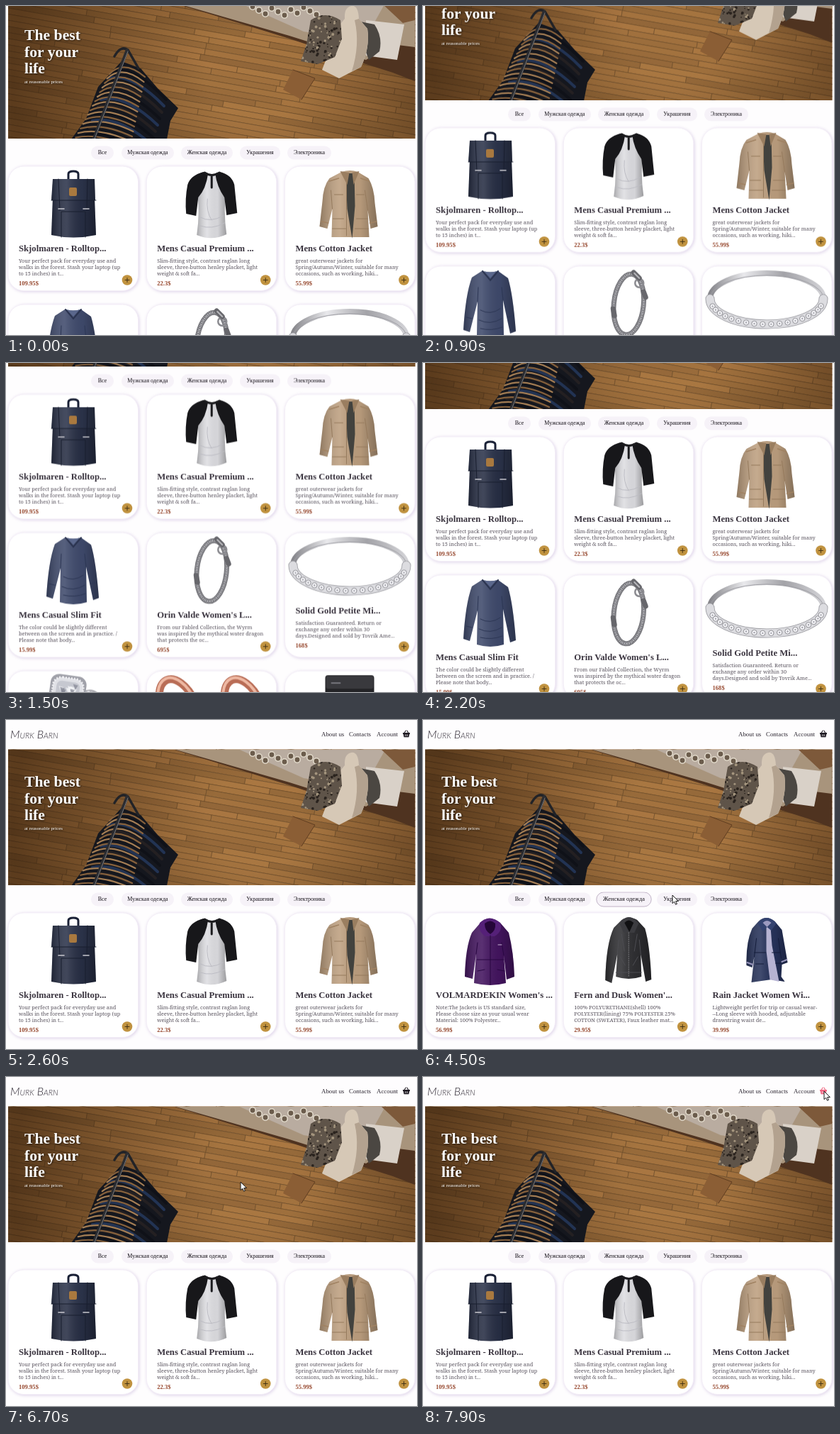
An HTML page that plays this animation: 580 px wide and 464 px high, repeating every 8000 ms.

```html
<!DOCTYPE html>
<html lang="en">
<head>
<meta charset="utf-8">
<title>Shop page</title>
<style>
html, body { margin: 0; width: 100%; height: 100%; overflow: hidden; background: #fefdfe; }
svg { display: block; width: 580px; height: 464px; font-family: "Liberation Serif", serif; }
#page, #cursor, .set, .pill, #basket, #pointer { animation: 8s linear infinite; }
#page { animation-name: scroll; }
#cursor { animation-name: move; animation-timing-function: ease-in-out; }
#pointer { animation-name: appear; animation-timing-function: step-end; }
.set { animation-timing-function: step-end; }
#all { animation-name: show-all; }
#women { animation-name: show-women; }
#jewelry { animation-name: show-jewelry; }
#basket { animation-name: basket; color: #1d1820; }
.pill { transform-box: fill-box; transform-origin: center; font-size: 8px; text-anchor: middle; stroke: transparent; }
.pill rect { fill: #f6f2f8; stroke-width: .8; }
.pill text { fill: #151118; stroke: none; }
#pill0 { animation-name: hover-all; }
#pill1 { animation-name: hover-men; }
#pill2 { animation-name: hover-women; }
#pill3 { animation-name: hover-jewelry; }
.box { fill: #fff; stroke: #f4eff7; filter: drop-shadow(1px 1px 2px #dcd1e8); }
.title { font-size: 12.7px; font-weight: bold; fill: #3a343f; }
.desc { font: 7.35px "Noto Serif", serif; fill: #57515c; }
.price { font-size: 8.6px; font-weight: bold; fill: #97492f; }
.nav { font-size: 8.9px; fill: #2c2631; }
.brand { font: italic 300 small-caps 16px Lato, sans-serif; fill: #29232e; }
.slogan { fill: #fff; filter: drop-shadow(1px 1px 1px #0009); }

@keyframes scroll {
  0%, 7.5% { transform: translateY(-46px); }
  11.25% { transform: translateY(-100px); }
  18.75% { transform: translateY(-227.5px); }
  21.25%, 25% { transform: translateY(-262px); }
  32%, 100% { transform: translateY(0); }
}
@keyframes move {
  0%, 36.25% { transform: translate(232px, 412px); }
  42%, 46% { transform: translate(202px, 252px); }
  50%, 53% { transform: translate(290px, 252px); }
  56.25% { transform: translate(352px, 247px); }
  58.5%, 64% { transform: translate(361px, 252px); }
  71.25% { transform: translate(153px, 253px); }
  73.5%, 76% { transform: translate(137px, 254px); }
  81.5% { transform: translate(300px, 165px); }
  91%, 100% { transform: translate(566px, 20px); }
}
@keyframes appear { 0% { visibility: hidden; } 36.25% { visibility: visible; } }
@keyframes show-all { 0% { visibility: visible; } 52.5% { visibility: hidden; } 75% { visibility: visible; } }
@keyframes show-women { 0% { visibility: hidden; } 52.5% { visibility: visible; } 61.9% { visibility: hidden; } }
@keyframes show-jewelry { 0% { visibility: hidden; } 61.9% { visibility: visible; } 75% { visibility: hidden; } }
@keyframes basket { 0%, 90% { color: #1d1820; } 92%, 100% { color: #ee6480; } }
@keyframes hover-all {
  0%, 72.5%, 79%, 100% { transform: none; stroke: transparent; }
  74.5%, 77% { transform: scale(1.06); stroke: #b6a6bd; }
}
@keyframes hover-men {
  0%, 41%, 49.5%, 69%, 74.5%, 100% { transform: none; stroke: transparent; }
  43%, 47.5%, 70.5%, 72% { transform: scale(1.06); stroke: #b6a6bd; }
}
@keyframes hover-women {
  0%, 48%, 58.5%, 65.5%, 70%, 100% { transform: none; stroke: transparent; }
  50%, 56.5%, 67%, 68% { transform: scale(1.06); stroke: #b6a6bd; }
}
@keyframes hover-jewelry {
  0%, 56.4%, 67.5%, 100% { transform: none; stroke: transparent; }
  58.5%, 65% { transform: scale(1.06); stroke: #b6a6bd; }
}
</style>
</head>
<body>
<svg id="stage" viewBox="0 0 580 464"></svg>
<script>
let seed = 11;
const random = () => (seed = (seed * 16807) % 2147483647) / 2147483647;
const repeat = (count, draw) => Array.from({ length: count }, (_, i) => draw(i)).join('');
const path = (d, fill, extra = '') => `<path d="${d}" fill="${fill}" ${extra}/>`;
const shaded = (d, fill) => path(d, fill) + path(d, 'url(#folds)');
const line = (d, color, width = 1, extra = '') =>
  path(d, 'none', `stroke="${color}" stroke-width="${width}" stroke-linecap="round" ${extra}`);
const rect = (x, y, w, h, fill, extra = '') =>
  `<rect x="${x}" y="${y}" width="${w}" height="${h}" fill="${fill}" ${extra}/>`;
const circle = (x, y, r, fill, extra = '') => `<circle cx="${x}" cy="${y}" r="${r}" fill="${fill}" ${extra}/>`;
const text = (x, y, content, type, extra = '') => `<text x="${x}" y="${y}" class="${type}" ${extra}>${content}</text>`;

// Product pictures, in card coordinates
const art = {
  backpack: () =>
    line('M85 19V11Q85 7 92 7T99 11V19', '#1a2136', 3) +
    shaded('M64 18H121L124 97Q92 104 61 97Z', '#272e44') +
    shaded('M63 18H122L123 48H61Z', '#2c344b') +
    line('M61 48H124M75 100V64H109V100M71 18L73 62M112 18L111 62', '#191e2f') +
    rect(86, 30, 11, 12, '#a9793f', 'rx="2"') +
    line('M71 60h8M106 60h8', '#c9c9cf', 1.6),
  raglan: () =>
    shaded('M78 11Q92 15 107 11L113 36Q108 62 113 96Q92 106 71 97Q76 62 71 36Z', '#dedee2') +
    path('M80 8Q62 13 58 26Q54 46 56 67L70 70L73 44Q84 32 87 10Z', '#17171a') +
    path('M104 8Q120 12 124 26L128 66L113 69L110 44Q99 28 97 10Z', '#17171a') +
    line('M82 9Q92 16 103 9M92 14V30', '#1b1b1e', 3) +
    line('M76 72Q90 80 108 70M76 84Q92 90 110 80M86 46Q84 64 92 76', '#bdbdc4'),
  fieldJacket: () =>
    shaded('M80 8Q92 4 103 8L118 17Q126 30 127 52L131 85L121 88L117 62L119 100H66L67 60L60 88L49 85L53 50Q54 28 63 17Z', '#bd9f7f') +
    path('M86 10L98 10L99 56L95 102L88 60Z', '#42423e') +
    path('M78 7L88 26L91 9ZM105 7L97 26L95 9Z', '#9a7e60') +
    line('M67 60L65 34M117 62L113 34M87 24V98M68 74H83M101 74H117M70 40H82M101 40H112M67 88H86M99 88H118', '#957a5d') +
    line('M63 21L76 17M107 17L119 21M52 78L61 80M120 80L129 78', '#a08262', 1.6),
  slimShirt: () =>
    shaded('M80 7Q92 10 103 7L117 17Q124 40 128 92L120 95L110 48L111 98Q92 104 73 98L74 50L63 93L54 90Q57 40 66 16Z', '#3f4a6c') +
    path('M83 7L92 17L101 7Q92 10 83 7Z', '#5a678c') +
    line('M81 7L92 20L103 7', '#2b3450', 2) +
    line('M74 50L75 30M110 48L108 30M78 62Q92 70 106 60M76 76Q92 84 108 74M78 88Q94 92 109 86M58 72L66 74M117 72L124 70', '#2d3755'),
  bracelet: () => {
    const band = (color, width, dash) => `<ellipse cx="92" cy="54" rx="21" ry="43" fill="none" stroke="${color}"
      stroke-width="${width}" stroke-dasharray="${dash}" transform="rotate(6 92 54)"/>`;
    return band('#727277', 7, 'none') + band('#a9a9ae', 5, '1 1.4') + band('#cfcfd3', 1, '1.5 2') +
      circle(107, 24, 6, 'none', 'stroke="#8b8b90" stroke-width="2.5"') +
      line('M99 9L107 17M113 36L116 44M70 60L72 70', '#67676c', 7) + line('M100 10L107 17', '#b9b9bd', 2);
  },
  bandRing: () => {
    const hoop = (ry, color, width) => `<ellipse cx="91.5" cy="46" rx="80" ry="${ry}" fill="none"
      stroke="${color}" stroke-width="${width}"/>`;
    const front = 'M11.5 46A80 36 0 0 0 171.5 46';
    const stone = i => {
      const angle = .3 + i * .15;
      const x = 91.5 - 80 * Math.cos(angle), y = 46 + 36 * Math.sin(angle);
      return circle(x, y, 3.7, '#f6f6f9', 'stroke="#85858b" stroke-width=".9"') + circle(x, y, 1.2, '#a4a4ac');
    };
    return hoop(36, 'url(#silver)', 8) + hoop(33, '#a0a0a6', 1) +
      line(front, '#97979d', 13) + line(front, '#dcdce0', 11.4) + repeat(18, stone);
  },
  diamond: () =>
    line('M108 32C134 22 140 64 96 97M73 55Q76 78 87 98M106 48Q112 80 88 97', '#adadb3', 8.5) +
    line('M108 31C130 24 135 64 96 95M73 55Q76 78 87 96M106 48Q110 80 88 95', '#f0f0f4', 4, 'stroke-dasharray="1 4"') +
    rect(58, 6, 51, 50, '#a0a1a9', 'rx="12" transform="rotate(8 84 31)"') +
    rect(62, 10, 43, 42, '#e0e1e6', 'rx="12" transform="rotate(8 84 31)" stroke="#f2f2f5" stroke-width="3" stroke-dasharray="2 2"') +
    rect(67, 15, 33, 32, '#c6c8d0', 'rx="7" transform="rotate(8 84 31)"') +
    repeat(28, () => {
      const x = 69 + random() * 23, y = 17 + random() * 22;
      return path(`M${x} ${y}l7 2l-4 6z`, random() < .6 ? '#f4f5f8' : '#888b97', 'opacity=".8"');
    }),
  earrings: () => repeat(2, i => `<g transform="translate(${i * 92})">` +
    '<ellipse cx="46" cy="52" rx="24" ry="43" fill="#fff" stroke="#b96d56" stroke-width="11" transform="rotate(-24 46 52)"/>' +
    '<ellipse cx="45" cy="51" rx="25" ry="44" fill="none" stroke="#eeb9a3" stroke-width="4" transform="rotate(-24 45 51)"/></g>'),
  drive: () => rect(57, 6, 69, 98, '#232326', 'rx="4"') + rect(58, 7, 67, 18, '#39393d', 'rx="3"') +
    line('M66 17H78', '#77777d', 2),
  parka: () =>
    shaded('M78 14Q90 1 106 14L118 28Q125 56 126 90L115 94L111 60L114 99Q92 105 69 99L72 58L67 93L56 90Q57 48 66 28Z', '#43145f') +
    path('M77 14Q90 2 106 14Q110 26 98 33H85Q74 26 77 14Z', '#552078') +
    path('M84 15Q92 8 99 15Q100 25 92 30Q84 25 84 15Z', '#250638') +
    line('M92 32V101M72 58L74 42M111 60L108 42M73 66H111M74 82L84 80M102 80L112 82', '#280741') +
    line('M103 45h5', '#c9b6d4'),
  leather: () =>
    shaded('M82 10Q92 3 104 10L115 22Q122 46 124 94L116 97L109 58L110 90Q92 96 74 90L76 58L68 99L59 95Q60 44 71 21Z', '#2e2e31') +
    path('M79 15Q92 -3 106 15L100 28H85Z', '#3c3c40') + path('M86 14Q92 7 99 14L93 27Z', '#111113') +
    line('M76 58L78 38M109 58L107 38M80 62L87 74M105 62L98 74M74 84H110M82 30L86 54M104 30L100 54', '#4d4d52') +
    line('M92 28V90', '#a2a2a7', .7, 'stroke-dasharray="1 2"'),
  raincoat: () =>
    shaded('M80 12Q90 2 103 12L113 24L121 70L113 73L112 90L117 97L98 94L70 98L74 62L71 77L63 74Q62 42 71 22Z', '#26325a') +
    path('M91 20L97 20L99 46L109 97L96 94L91 54Z', '#b6b3d2') +
    path('M79 15Q92 -1 105 15L98 25L92 20L86 26Z', '#344370') + path('M86 14Q92 8 98 14L92 20Z', '#9c9ac0') +
    line('M74 62L77 36M112 64L108 36M74 56H90M99 56H111M76 72H87M104 71H111', '#141d3b') +
    line('M64 70L72 73M113 69L120 66', '#9997bd', 2)
};

const bracelet = { art: 'bracelet', title: "Orin Valde Women's L...", price: 695, desc:
  'From our Fabled Collection, the Wyrm|was inspired by the mythical water dragon|that protects the oc...' };
const bandRing = { art: 'bandRing', title: 'Solid Gold Petite Mi...', price: 168, lift: 6, desc:
  'Satisfaction Guaranteed. Return or|exchange any order within 30|days.Designed and sold by Tovrik Ame...' };
const diamond = { art: 'diamond', title: 'White Gold Plated Pr...', price: 9.99, desc:
  'Classic Created Wedding Engagement|Solitaire Diamond Promise Ring for Her.|Gifts to spoil your love ...' };

const sets = {
  all: [
    { art: 'backpack', title: 'Skjolmaren - Rolltop...', price: 109.95, desc:
      'Your perfect pack for everyday use and|walks in the forest. Stash your laptop (up|to 15 inches) in t...' },
    { art: 'raglan', title: 'Mens Casual Premium ...', price: 22.3, desc:
      'Slim-fitting style, contrast raglan long|sleeve, three-button henley placket, light|weight &amp; soft fa...' },
    { art: 'fieldJacket', title: 'Mens Cotton Jacket', price: 55.99, desc:
      'great outerwear jackets for|Spring/Autumn/Winter, suitable for many|occasions, such as working, hiki...' },
    { art: 'slimShirt', title: 'Mens Casual Slim Fit', price: 15.99, desc:
      'The color could be slightly different|between on the screen and in practice. /|Please note that body...' },
    bracelet, bandRing, diamond,
    { art: 'earrings', title: 'Rose Gold Earrings', price: 10.99, desc: '' },
    { art: 'drive', title: 'Portable Hard Drive', price: 64, desc: '' }
  ],
  women: [
    { art: 'parka', title: "VOLMARDEKIN Women's ...", price: 56.99, desc:
      'Note:The Jackets is US standard size,|Please choose size as your usual wear|Material: 100% Polyester...' },
    { art: 'leather', title: "Fern and Dusk Women'...", price: 29.95, desc:
      '100% POLYURETHANE(shell) 100%|POLYESTER(lining) 75% POLYESTER 25%|COTTON (SWEATER), Faux leather mat...' },
    { art: 'raincoat', title: 'Rain Jacket Women Wi...', price: 39.99, desc:
      'Lightweight perfet for trip or casual wear-|--Long sleeve with hooded, adjustable|drawstring waist de...' }
  ],
  jewelry: [bracelet, bandRing, diamond]
};

function card(item, i) {
  const lift = item.lift || 0;
  const x = 3 + (i % 3) * 195.25, y = 272 + Math.floor(i / 3) * 195;
  return `<g transform="translate(${x} ${y})"><rect width="183.5" height="175.5" rx="22" class="box"/>` +
    art[item.art]() +
    text(15, 120 - lift, item.title, 'title') +
    item.desc.split('|').map((row, n) => text(15, 135.7 + n * 9.2 - lift, row, 'desc')).join('') +
    text(15, 168 - lift, item.price + '$', 'price') +
    circle(168, 160.5, 7.3, '#c0923f') + line('M165 160.5h6M168 157.5v6', '#3a2c12', .9) + '</g>';
}

function floor() {
  let planks = '';
  for (let y = -70; y < 350; y += 8.5) {
    for (let x = -40 - random() * 80; x < 640;) {
      const length = 80 + random() * 150;
      planks += rect(x, y, length, 8.5, `hsl(31 44% ${41 + random() * 7}%)`, 'stroke="#6a4825" stroke-width=".6"');
      x += length;
    }
  }
  return `<g transform="rotate(10 290 137)">${planks}</g>`;
}

function clothesRack() {
  const mass = 'M163 124L190 134L214 162L243 190L232 208L227 234H92L113 205L130 160Z';
  const garments = repeat(11, i => line(
    `M${150 - i * 4} ${138 + i * 10}Q${180 - i * 3} ${130 + i * 10} ${226 - i * 3} ${178 + i * 9}`,
    ['#0f1118', '#223353', '#242022'][i % 3], 4));
  const hangers = repeat(15, i => line(
    `M${146 - i * 3.4} ${142 + i * 6.4}Q${166 - i * 2.6} ${121 + i * 7.4} ${196 - i * 1.5} ${146 + i * 7}`,
    i % 2 ? '#a37d54' : '#86613c', 2.2));
  return path(mass, '#15171e') + `<clipPath id="rack">${path(mass, '#000')}</clipPath><g clip-path="url(#rack)">${garments}</g>` +
    hangers + line('M153 117Q162 101 172 108L187 134', '#222327', 3.5) +
    line('M171 108L123 236', '#2b2c30', 4.5) + line('M172 110L124 236', '#77777a', 1);
}

function display() {
  const scarf = 'M430 66Q450 52 472 66L474 92L464 118L440 128L416 124L424 100Z';
  const spots = repeat(130, () => circle(416 + random() * 60, 56 + random() * 74, .6 + random() * 1.6,
    random() < .6 ? '#2a231e' : '#a3947d'));
  return path('M238 42H577V152L546 140L508 128L400 92Z', '#4f3320') +
    path('M240 42H545L577 66V104L545 100L508 122L400 88Z', '#a8947c') +
    path('M330 42H535L505 96L420 82Z', '#b9aca0') +
    path('M508 66L562 72L552 122L508 116Z', '#d9d1c8') + path('M530 42H577V66L560 70Z', '#7d593a') +
    repeat(11, i => circle(348 + i * 9, 47 + (i * 5) % 13, 4.2, '#6b5c4c', 'stroke="#e2dacb" stroke-width="1.6"')) +
    path('M405 136L436 148L417 178L391 164Z', '#8b5e35') + line('M405 136L436 148L417 178', '#5f3d20') +
    path('M500 68L520 72Q532 90 527 110L512 122L504 100Z', '#4b4742') +
    path('M478 64Q477 48 487 46T498 64L510 78Q514 104 501 132L470 148L446 136Q454 112 468 100V76Z', '#d6c8b6') +
    path('M498 64L510 78Q514 104 501 132L488 138Q500 100 492 66Z', '#b3a28f') +
    `<clipPath id="scarf">${path(scarf, '#000')}</clipPath>` + path(scarf, '#5f5449') +
    `<g clip-path="url(#scarf)">${spots}</g>`;
}

const hero = `<g clip-path="url(#hero)">${floor()}${rect(3, 41, 575, 193, 'url(#shade)')}${display()}${clothesRack()}</g>
  <g class="slogan">${['The best', 'for your', 'life'].map((row, i) =>
    text(26, 94 + i * 23.7, row, '', 'font-size="21.7" font-weight="bold"')).join('')}
  ${text(26, 155, 'at reasonable prices', '', 'font-size="6.85"')}</g>`;

const pills = [['Все', 120, 32], ['Мужская одежда', 163, 74], ['Женская одежда', 247, 73],
  ['Украшения', 330, 57], ['Электроника', 397, 62]].map(([label, x, w], i) =>
  `<g class="pill" id="pill${i}"><rect x="${x}" y="243.5" width="${w}" height="19" rx="9.5"/>${text(x + w / 2, 255.2, label, '')}</g>`).join('');

const header = text(6, 25.5, 'Murk Barn', 'brand') +
  text(445, 23, 'About us', 'nav') + text(484, 23, 'Contacts', 'nav') + text(523, 23, 'Account', 'nav') +
  `<g id="basket">${path('M560 18h10v1.7h-.6l-1 4.5h-6.8l-1-4.5h-.6z', 'currentColor')}
   ${line('M562.3 18l1.8-3M567.7 18l-1.8-3', 'currentColor', 1.1)}${line('M563.3 20.6v2M565 20.6v2M566.7 20.6v2', '#fff', .6)}</g>`;

document.getElementById('stage').innerHTML = `
  <defs>
    <clipPath id="hero"><rect x="3" y="41.5" width="574.5" height="191.5"/></clipPath>
    <radialGradient id="shade" gradientUnits="userSpaceOnUse" cx="350" cy="145" r="340">
      <stop offset=".2" stop-color="#2a1606" stop-opacity=".04"/><stop offset="1" stop-color="#2a1606" stop-opacity=".62"/>
    </radialGradient>
    <linearGradient id="silver">
      <stop stop-color="#86868b"/><stop offset=".3" stop-color="#e9e9ec"/>
      <stop offset=".65" stop-color="#a3a3a8"/><stop offset="1" stop-color="#d2d2d6"/>
    </linearGradient>
    <linearGradient id="folds">
      <stop stop-opacity=".25"/><stop offset=".35" stop-color="#fff" stop-opacity=".12"/>
      <stop offset=".7" stop-opacity=".04"/><stop offset="1" stop-opacity=".3"/>
    </linearGradient>
  </defs>
  <g id="page">${header}${hero}${pills}
    ${Object.entries(sets).map(([id, items]) => `<g class="set" id="${id}">${items.map(card).join('')}</g>`).join('')}
  </g>
  <g id="cursor"><g id="pointer">${path('M0 0V11.6L2.7 9.2L4.5 13.2L6.4 12.4L4.7 8.5H8.4Z', '#fff', 'stroke="#000" stroke-width=".9"')}</g></g>`;
</script>
</body>
</html>
```
